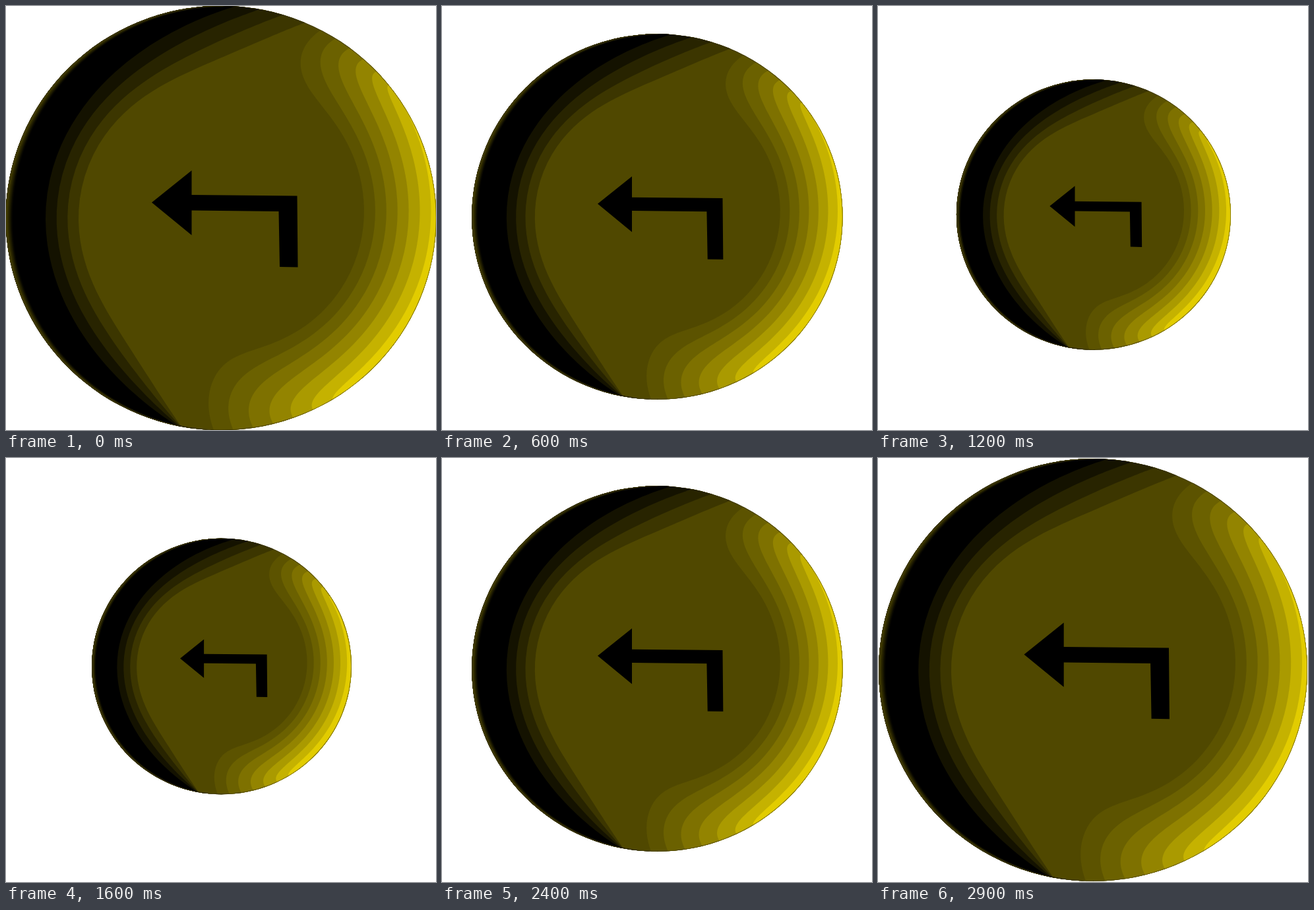
Recreate the animation shown at these times as an HTML page with a canvas. Size 652 by 642 pixels, loop 3000 ms.

```html
<!DOCTYPE html>
<html lang="en">
<head>
<meta charset="utf-8">
<style>
html, body { margin: 0; width: 100%; height: 100%; overflow: hidden; background: #fff; }
canvas { display: block; }
</style>
</head>
<body>
<canvas id="stage" width="652" height="642"></canvas>
<script>
const ctx = document.getElementById('stage').getContext('2d');
const LOOP = 3000, STEP = 100;
const CX = 326, CY = 321, R = 326, RAD = Math.PI / 180;

const olive = v => `rgb(${Math.round(v)},${Math.round(v * 0.903)},0)`;
const lerp = (a, b, t) => a + (b - a) * t;

// One shading band hugging the rim. Its inner edge lies `depth` inside the rim
// and drops to the rim at mid - half and mid + half degrees.
function band({ mid, half, depth, power, round, tilt = 0, hook = 0 }) {
  const path = new Path2D(), n = 60;
  for (let i = -n; i <= n; i++) {
    const x = Math.sign(i) * (1 - (1 - Math.abs(i) / n) ** 3);
    const h = (1 - Math.abs(x) ** power) ** round;
    const turn = x * half * (1 - hook * (1 - h) ** 2);
    const r = R - Math.max(0, depth + tilt * turn) * h;
    const a = (mid + turn) * RAD;
    path.lineTo(CX + r * Math.cos(a), CY + r * Math.sin(a));
  }
  const end = half * (1 - hook);
  path.arc(CX, CY, R + 100, (mid + end) * RAD, (mid - end) * RAD, true);
  path.closePath();
  return path;
}

const bands = [];
for (let i = 0; i < 4; i++) {
  const t = i / 3;
  bands.push([olive(60 - 20 * i), band({
    mid: -lerp(163, 172, t) + 2 * lerp(163, 172, t) - 360 + 2 * (180 - lerp(163, 172, t)),
    half: lerp(97, 88, t), depth: lerp(110, 60, t), power: lerp(5, 3.3, t), round: 1
  })]);
}
for (let i = 0; i < 7; i++) {
  bands.push([olive(92 + i * (14 + 1.4 * i)), band({
    mid: 15 - 0.4 * i, half: 81.5 - 5.9 * i, depth: 112 - 17 * i,
    power: 4 + 6 / (1 + i), round: 0.4, tilt: 0.18, hook: 0.06 - 0.009 * i
  })]);
}

const arrow = new Path2D(
  'M221 297.5 281.5 249V286L441.5 287.5 442.5 395.5 415 395 413.5 311 281.5 309.5V347Z');

function scaleAbout(x, y, s) {
  ctx.translate(x, y);
  ctx.scale(s, s);
  ctx.translate(-x, -y);
}

function draw(time) {
  const u = 1 - Math.cos(2 * Math.PI * time / LOOP);
  const s = 1 - 0.2038 * u, size = 1 - 0.2006 * u;
  const cx = CX + 0.5 * u, cy = CY - 2.8 * u, rx = 326.4 * size, ry = 321.3 * size;
  const disc = new Path2D();
  disc.ellipse(cx, cy, rx, ry, 0, 0, 2 * Math.PI);

  ctx.fillStyle = '#fff';
  ctx.fillRect(0, 0, 652, 642);

  ctx.save();
  ctx.clip(disc);
  ctx.fillStyle = olive(80);
  ctx.fillRect(0, 0, 652, 642);

  ctx.save();
  scaleAbout(328.7, 309, s);
  for (const [color, path] of bands) {
    ctx.fillStyle = color;
    ctx.fill(path);
  }
  ctx.restore();

  // Faint reflected light along the left edge
  for (let i = 0; i < 5; i++) {
    const d = (10 - 2.1 * i) * size;
    const rim = new Path2D();
    rim.rect(-20, -20, cx + 20, 700);
    rim.moveTo(cx, cy + ry);
    rim.ellipse(cx + d, cy + d * 0.1, rx, ry, 0, Math.PI / 2, Math.PI * 1.5);
    rim.lineTo(cx, cy - ry);
    rim.closePath();
    ctx.fillStyle = olive(8 + 16 * i);
    ctx.fill(rim, 'evenodd');
  }
  ctx.strokeStyle = 'rgba(40,35,0,.6)';
  ctx.lineWidth = 1.4;
  ctx.stroke(disc);
  ctx.restore();

  ctx.save();
  scaleAbout(327.7, 312.5, s);
  ctx.fillStyle = '#000';
  ctx.fill(arrow);
  ctx.restore();
}

const start = performance.now();
function tick() {
  const t = (performance.now() - start) % LOOP;
  draw(Math.floor(t / STEP) * STEP);
  requestAnimationFrame(tick);
}
tick();
</script>
</body>
</html>
```
